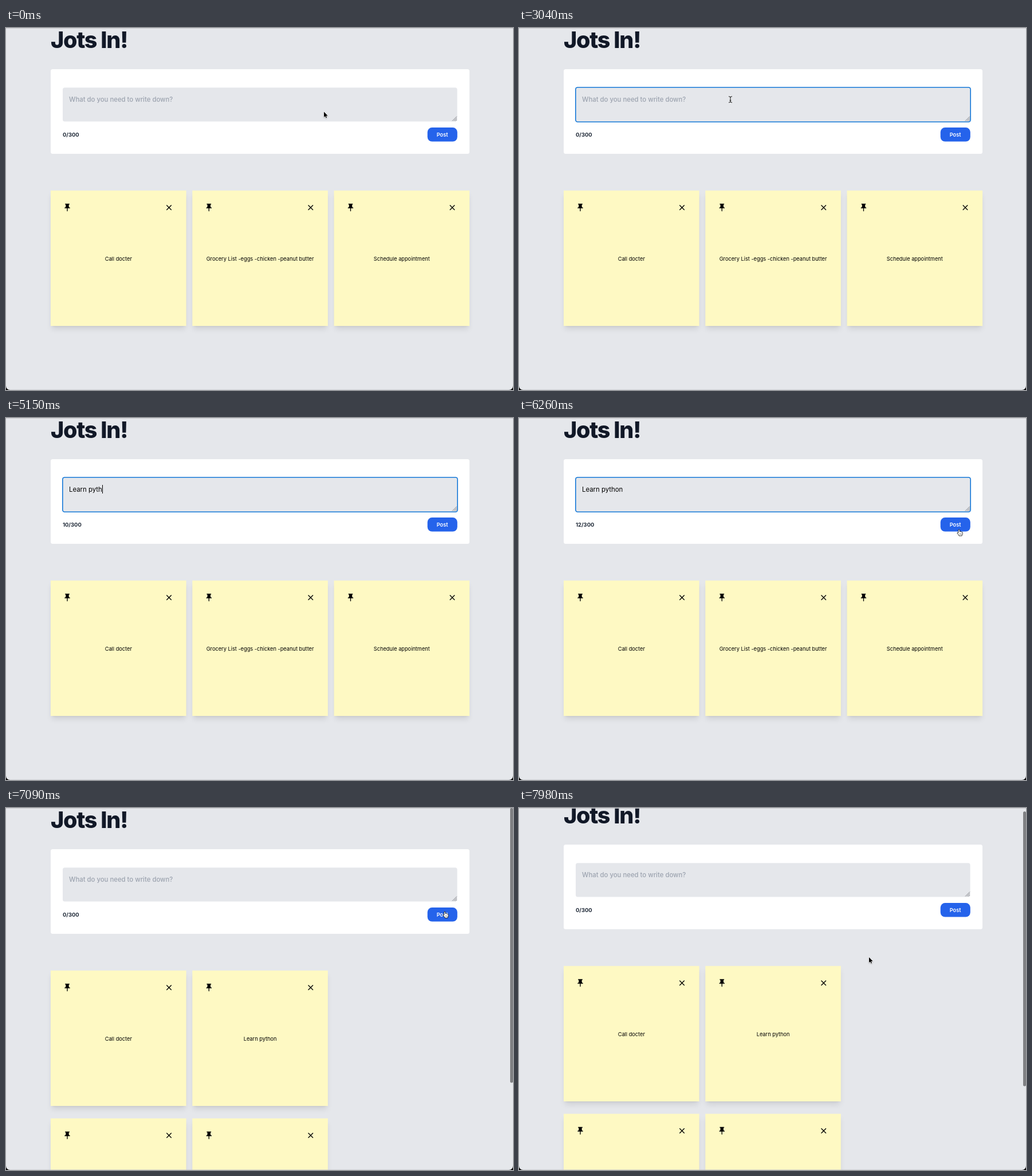
An HTML page with a canvas for the animation above (8000 ms loop, 885 by 633 pixels).

```html
<!DOCTYPE html>
<html lang="en">
<head>
<meta charset="utf-8">
<title>Sticky notes</title>
<style>
html, body { margin: 0; width: 100%; height: 100%; overflow: hidden; background: #e5e7eb; }
canvas { display: block; }
</style>
</head>
<body>
<canvas id="stage" width="885" height="633"></canvas>
<script>
const W = 885, H = 633, LOOP = 8000;
const c = document.getElementById('stage').getContext('2d');

const GRAY = '#e5e7eb', NOTE = '#fef9c3', BLUE = '#2563eb', RING = '#1478d8';
const FAMILY = 'Inter, "Liberation Sans", sans-serif';
const DRAFT = 'Learn python';
const KEYS = [3680, 3960, 4110, 4210, 4320, 4430, 4650, 4930, 5070, 5150, 5300, 5430];
const FOCUS = 1330, SENT = 6870, POSTED = 7080;

const PIN = new Path2D('M16 9V4h1c.55 0 1-.45 1-1s-.45-1-1-1H7c-.55 0-1 .45-1 1s.45 1 1 1h1v5c0 1.66-1.34 3-3 3v2h5.97v7l1 1 1-1v-7H19v-2c-1.66 0-3-1.34-3-3z');
const CLOSE = new Path2D('M19 6.41 17.59 5 12 10.59 6.41 5 5 6.41 10.59 12 5 17.59 6.41 19 12 13.41 17.59 19 19 17.59 13.41 12z');
const ARROW = new Path2D('M0 0V9.4L2.2 7.5 3.6 10.8 5 10.2 3.7 7H6.7Z');
const BEAM = new Path2D('M-3-5.2Q-.6-5.2 0-4.2Q.6-5.2 3-5.2M-3 5.2Q-.6 5.2 0 4.2Q.6 5.2 3 5.2M0-4.2V4.2M-1.3 1.6H1.3');
const HAND = new Path2D('M-1.2.8Q0-.8 1.2.8V3.8Q2.4 3 3 4.1Q4.2 3.4 4.7 4.6Q6.2 4.2 6.2 5.8V7.8Q6 9.2 5 10.2V11.2H-.2V10.2L-3 6.8Q-3.4 5.2-1.9 5.7L-1.2 6.3Z');

// time, x, y of the pointer
const TRACK = [
  [0, 555, 146.5], [20, 548, 145], [370, 471, 136], [650, 471, 136], [700, 467, 134],
  [910, 467, 134], [1110, 408.5, 127], [1280, 369, 125], [5880, 369, 125],
  [6000, 752, 200], [6150, 752, 200], [6350, 780, 191], [6700, 766, 181],
  [7500, 766, 181], [7650, 611, 261], [LOOP, 611, 261]
];

function pointerAt(t) {
  const i = Math.max(1, TRACK.findIndex(k => k[0] > t));
  const [t0, x0, y0] = TRACK[i - 1], [t1, x1, y1] = TRACK[i];
  const p = (t - t0) / (t1 - t0), e = p * p * (3 - 2 * p);
  return [x0 + (x1 - x0) * e, y0 + (y1 - y0) * e];
}

function box(x, y, w, h, r, fill) {
  c.beginPath();
  c.roundRect(x, y, w, h, r);
  c.fillStyle = fill;
  c.fill();
}

function text(str, x, y, size, weight, color, align = 'left', spacing = 0) {
  c.font = `${weight} ${size}px ${FAMILY}`;
  c.letterSpacing = spacing + 'px';
  c.textAlign = align;
  c.fillStyle = color;
  c.fillText(str, x, y);
}

function shadow(x, y, size, dy, blur, inset) {
  c.save();
  c.shadowColor = 'rgba(0,0,0,.1)';
  c.shadowBlur = blur;
  c.shadowOffsetY = dy;
  c.fillStyle = '#000';
  // the caster sits off stage so only its shadow is seen
  c.shadowOffsetX = 2000;
  c.fillRect(x + inset - 2000, y + inset, size - 2 * inset, size - 2 * inset);
  c.restore();
}

function icon(path, x, y) {
  c.save();
  c.translate(x, y);
  c.scale(.67, .67);
  c.translate(-12, -12);
  c.fillStyle = '#000';
  c.fill(path);
  c.restore();
}

function note(col, row, label) {
  const x = 78 + col * 247.25, y = 284.3 + row * 258.5, size = 236.6;
  shadow(x, y, size, 6.7, 10, 2);
  shadow(x, y, size, 2.7, 4, 2.7);
  box(x, y, size, size, 0, NOTE);
  icon(PIN, x + 29, y + 29.7);
  icon(CLOSE, x + 206.5, y + 29.7);
  text(label, x + size / 2, y + 122.7, 9.22, 400, '#000', 'center');
}

function caretOn(t) {
  if (t < KEYS[0]) return t < 1930 || (t >= 2480 && t < 3040) || t >= 3630;
  return t < 5980 || t >= 6540;
}

function form(t) {
  const focused = t >= FOCUS && t < SENT;
  const typed = t < SENT ? DRAFT.slice(0, KEYS.filter(k => k <= t).length) : '';
  box(78, 72, 731, 148, 3.5, '#fff');
  if (focused) {
    box(98, 103, 691, 62, 4.5, RING);
    box(99.6, 104.6, 687.8, 58.8, 3, GRAY);
  } else {
    box(99, 104.3, 688.6, 59.2, 3.5, GRAY);
  }

  c.lineWidth = .8;
  c.strokeStyle = '#6b6d72';
  c.beginPath();
  for (const d of [8, 5.3, 2.6]) {
    c.moveTo(787 - d, 162.6);
    c.lineTo(787, 162.6 - d);
  }
  c.stroke();

  if (typed) text(typed, 110, 129, 11.4, 400, '#000');
  else text('What do you need to write down?', 110, 129, 11.35, 500, '#9ca3af');
  if (focused && caretOn(t)) {
    c.font = `400 11.4px ${FAMILY}`;
    c.letterSpacing = '0px';
    c.fillStyle = '#000';
    c.fillRect(Math.round(110 + c.measureText(typed).width), 117, 1, 15);
  }
  text(typed.length + '/300', 99, 190.3, 9.38, 700, '#1f2937');
  box(735.7, 174.1, 52.1, 24.5, 8, BLUE);
  text('Post', 761.6, 190.3, 9.2, 600, '#fff', 'center');
}

function pointer(t) {
  if (t >= 3700 && t < 5870) return;
  const [x, y] = pointerAt(t);
  const overField = x > 99 && x < 788 && y > 104 && y < 164;
  const overButton = x > 736 && x < 788 && y > 174 && y < 198.5;
  c.save();
  c.translate(x, y);
  c.lineJoin = 'round';
  if (overButton) {
    c.lineWidth = .8;
    c.strokeStyle = '#000';
    c.fillStyle = '#fff';
    c.fill(HAND);
    c.stroke(HAND);
    c.lineWidth = .4;
    c.stroke(new Path2D('M1.2 6.8V9.2M2.7 6.8V9.2M4.2 6.8V9.2'));
  } else if (overField && t >= 20) {
    c.lineWidth = 2.2;
    c.strokeStyle = 'rgba(255,255,255,.7)';
    c.stroke(BEAM);
    c.lineWidth = 1;
    c.strokeStyle = '#000';
    c.stroke(BEAM);
  } else {
    c.shadowColor = 'rgba(0,0,0,.25)';
    c.shadowBlur = 2;
    c.shadowOffsetY = 1;
    c.lineWidth = 1.2;
    c.strokeStyle = '#fff';
    c.stroke(ARROW);
    c.shadowColor = 'transparent';
    c.fillStyle = '#000';
    c.fill(ARROW);
  }
  c.restore();
}

function windowEdge() {
  c.fillStyle = '#cbccd0';
  c.fillRect(0, 0, W, 1);
  c.fillStyle = '#c4c5c9';
  c.fillRect(0, H - .6, W, .6);
  c.beginPath();
  c.rect(0, H - 10, W, 10);
  c.roundRect(0, H - 30, W, 30, [0, 0, 7, 7]);
  c.save();
  c.clip('evenodd');
  c.fillStyle = '#000';
  c.fillRect(0, H - 10, W, 10);
  c.restore();
}

function scrollAt(t) {
  return t < 7930 ? 0 : t < 7950 ? 2 : t < 7980 ? 5 : 8;
}

function draw(t) {
  const scroll = scrollAt(t);
  c.clearRect(0, 0, W, H);
  c.fillStyle = GRAY;
  c.fillRect(0, 0, W, H);

  c.save();
  c.translate(0, -scroll);
  text('Jots In!', 78, 35, 39.5, 800, '#111827', 'left', -1.3);
  form(t);
  note(0, 0, 'Call docter');
  if (t < POSTED) {
    note(1, 0, 'Grocery List -eggs -chicken -peanut butter');
    note(2, 0, 'Schedule appointment');
  } else {
    note(1, 0, DRAFT);
    note(0, 1, 'Grocery List -eggs -chicken -peanut butter');
    note(1, 1, 'Schedule appointment');
  }
  c.restore();

  windowEdge();
  if (t >= POSTED) box(880, scroll * .76, 5, 480.5, 2.5, '#7f8083');
  pointer(t);
}

let start;
function frame(now) {
  start ??= now;
  draw((now - start) % LOOP);
  requestAnimationFrame(frame);
}
requestAnimationFrame(frame);
</script>
</body>
</html>
```
